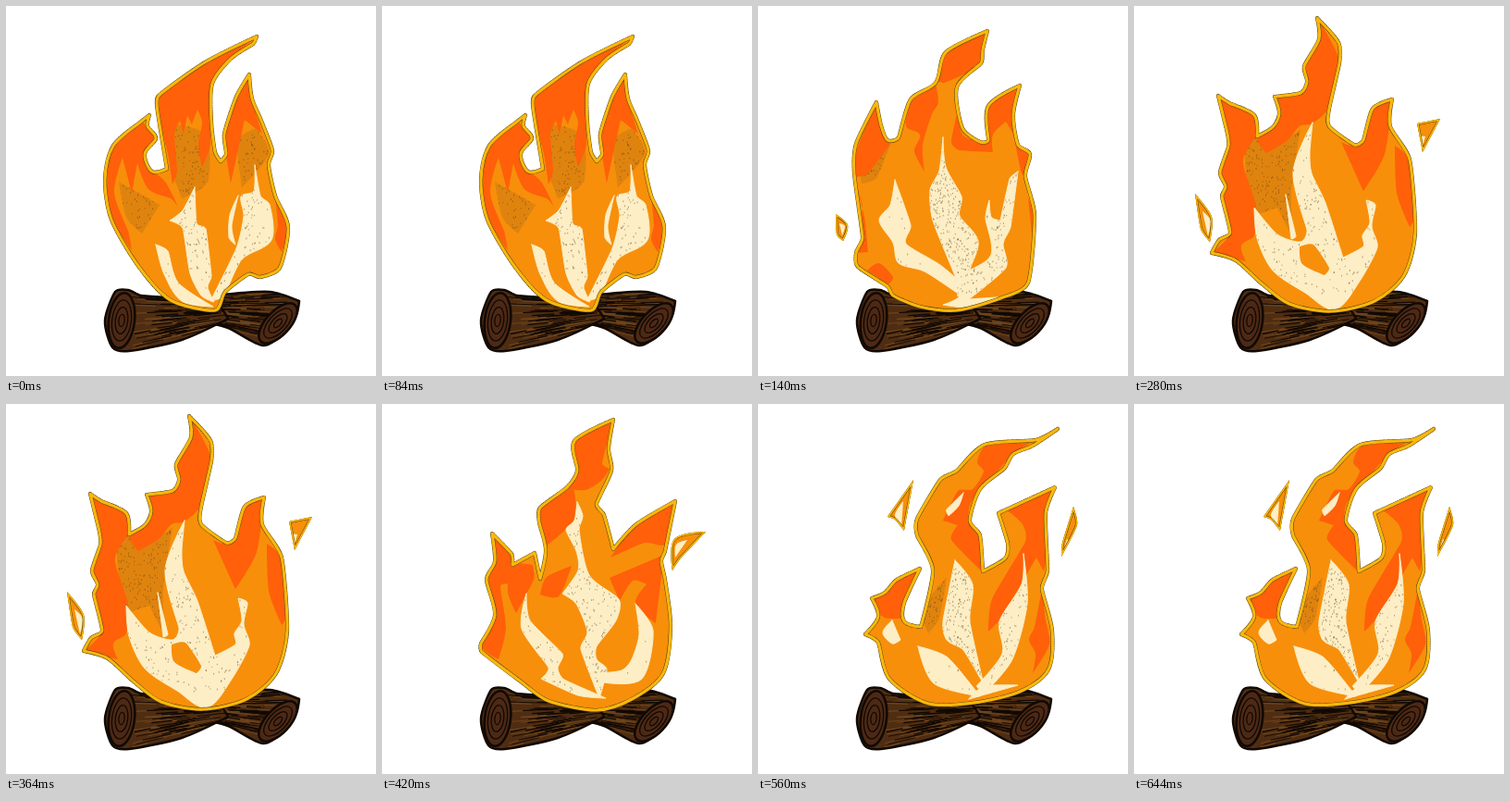
An HTML page with a canvas for the animation above (0.7 s loop, 400 by 400 pixels).

```html
<!DOCTYPE html>
<html lang="en">
<head>
<meta charset="utf-8">
<title>Campfire</title>
<style>
html, body { margin: 0; width: 100%; height: 100%; overflow: hidden; background: #fff; }
canvas { display: block; width: 400px; height: 400px; }
</style>
</head>
<body>
<canvas id="stage" width="400" height="400"></canvas>
<script>
const STEP = 140;
const ORANGE = '#f78f0b', YELLOW = '#fbb70d', RED = '#ff6009', CREAM = '#fdeec5', OCHRE = '#df830f', BARK = '#110904';
const ctx = document.getElementById('stage').getContext('2d');
let edge;

function random(seed) {
  return () => (seed = seed * 16807 % 2147483647) / 2147483647;
}

// Closed curve through the points: gentle turns are rounded, sharp ones stay pointed.
function curve(text) {
  const pts = text.split(' ').map(p => p.split(',').map(Number));
  const n = pts.length, path = new Path2D();
  const tangent = i => {
    const [a, b, c] = [pts[(i + n - 1) % n], pts[i % n], pts[(i + 1) % n]];
    const u = [b[0] - a[0], b[1] - a[1]], v = [c[0] - b[0], c[1] - b[1]];
    const lu = Math.hypot(...u), lv = Math.hypot(...v);
    if ((u[0] * v[0] + u[1] * v[1]) / (lu * lv) < 0.15) return [0, 0];
    const k = Math.min(lu, lv) * 0.3 / Math.hypot(u[0] + v[0], u[1] + v[1]);
    return [(u[0] + v[0]) * k, (u[1] + v[1]) * k];
  };
  path.moveTo(...pts[0]);
  for (let i = 0; i < n; i++) {
    const p = pts[i], q = pts[(i + 1) % n], s = tangent(i), t = tangent(i + 1);
    path.bezierCurveTo(p[0] + s[0], p[1] + s[1], q[0] - t[0], q[1] - t[1], q[0], q[1]);
  }
  path.closePath();
  return path;
}

function paint(path, fill, line, width) {
  if (fill) { ctx.fillStyle = fill; ctx.fill(path); }
  if (line) { ctx.strokeStyle = line; ctx.lineWidth = width; ctx.stroke(path); }
}

function within(path, drawInside) {
  ctx.save();
  ctx.clip(path);
  drawInside();
  ctx.restore();
}

function speckle(path, count) {
  const rnd = random(91);
  within(path, () => {
    ctx.fillStyle = 'rgba(80, 58, 20, .45)';
    for (let i = 0; i < count; i++) ctx.fillRect(105 + rnd() * 200, 120 + rnd() * 190, 1, 1 + rnd());
  });
}

function body(pts) {
  edge = curve(pts);
  ctx.save();
  ctx.clip(edge);
  paint(edge, ORANGE);
}

const red = pts => paint(curve(pts), RED);
const hole = pts => paint(curve(pts), ORANGE);

function ochre(pts) {
  const path = curve(pts);
  paint(path, OCHRE);
  speckle(path, 1300);
}

function cream(pts, grain = 900) {
  const path = curve(pts);
  paint(path, CREAM, CREAM, 1);
  speckle(path, grain);
}

function outline(path) {
  ctx.setLineDash([1, 1.5]);
  paint(path, null, '#4b3a0a', 4.2);
  ctx.setLineDash([]);
  paint(path, null, YELLOW, 3.2);
}

function rim() {
  ctx.restore();
  outline(edge);
}

function ember(pts, core) {
  const path = curve(pts);
  paint(path, ORANGE);
  paint(curve(core), CREAM);
  within(path, () => outline(path));
}

// Wood grain from the segment x = x0, y0..y1 to the segment x = x2, y2..y3.
function hatch([x0, y0, y1], [x2, y2, y3], count, color, seed) {
  const rnd = random(seed), mix = (p, q, t) => p + (q - p) * t;
  ctx.strokeStyle = color;
  for (let i = 0; i < count; i++) {
    const t = rnd(), from = rnd() * 0.8, to = from + 0.15 + rnd() * 0.3;
    const y = s => mix(mix(y0, y1, t), mix(y2, y3, t), s);
    ctx.lineWidth = 0.7 + rnd() * 0.8;
    ctx.beginPath();
    ctx.moveTo(mix(x0, x2, from), y(from));
    ctx.lineTo(mix(x0, x2, to), y(to) + rnd() * 2 - 1);
    ctx.stroke();
  }
}

function log(pts, a, b, seed) {
  const path = curve(pts);
  paint(path, '#4f2d12');
  within(path, () => {
    hatch(a, b, 45, '#70451a', seed);
    hatch(a, b, 75, BARK, seed + 50);
  });
  paint(path, null, BARK, 2.5);
}

function rings(x, y, rx, ry, tilt) {
  for (const k of [1, 0.74, 0.48, 0.22]) {
    const ring = new Path2D();
    ring.ellipse(x, y, rx * k, ry * k, tilt, 0, 7);
    paint(ring, k === 1 ? '#4d2915' : null, BARK, k === 1 ? 2.5 : 1.3);
  }
}

function logs() {
  log('205,321 235,312 285,309 317,319 314,334 303,351 278,367 240,348 205,338', [205, 316, 342], [300, 308, 366], 7);
  log('118,309 132,307 146,313 225,320 240,338 190,361 133,373 115,369 107,340', [134, 308, 372], [232, 318, 346], 19);
  rings(125, 340, 14, 30, 0.12);
  rings(294, 343, 13, 27, 0.75);
}

function leanRight() {
  body('271,33 267,41 243,57 223,84 222,125 226,158 232,168 238,160 236,138 249,98 263,74 266,100 276,124 288,156 284,172 291,205 305,239 296,283 275,293 262,290 237,309 226,329 178,318 143,281 114,231 107,188 116,151 146,125 155,118 153,130 162,143 150,160 158,179 174,176 164,115 165,97 215,61');
  ochre('182,128 216,140 218,190 190,208 176,165');
  ochre('250,146 270,132 284,160 255,196');
  ochre('122,190 166,215 147,246 130,228');
  red('146,125 118,149 107,180 112,225 136,264 132,243 117,202 126,164 136,202 142,170 154,198 178,208 186,217 172,190 150,168 162,143');
  red('271,33 215,61 163,98 164,115 175,160 180,193 185,178 182,138 188,124 192,139 196,118 201,128 207,112 212,126 208,150 212,174 221,150 222,85 243,57');
  red('263,74 239,123 235,140 243,192 258,123 277,138 266,102');
  red('291,206 305,239 298,266 291,252 294,237');
  cream('204,196 191,221 177,232 191,240 199,289 211,313 225,320 218,304 222,292 216,241 206,235');
  cream('162,258 175,265 186,299 224,325 190,319 171,290', 200);
  cream('269,172 275,205 285,215 287,253 255,274 236,313 221,319 249,262 257,227 254,206 268,200');
  cream('251,205 244,238 248,258 241,250 242,226', 0);
  rim();
}

function broad() {
  body('248,27 243,47 241,62 215,88 221,132 240,147 249,145 249,108 283,86 276,118 281,150 294,160 289,184 299,226 292,299 262,316 215,329 175,325 146,313 140,303 108,282 106,267 113,250 104,181 106,149 128,104 133,129 140,145 152,142 165,101 192,83 203,50');
  ochre('112,172 143,150 128,186 112,192');
  red('248,27 203,50 190,78 201,83 228,71 241,60');
  red('192,83 165,101 160,130 175,139 169,157 180,179 178,151 188,117 195,104');
  red('128,104 107,155 104,185 119,181 144,148 134,138');
  red('106,194 113,218 106,267 119,266 115,228');
  red('118,286 131,278 146,293 141,301');
  red('283,86 249,108 248,146 222,140 216,112 209,147 218,156 254,158 254,139 268,125 276,138');
  red('276,138 296,160 289,187 284,178');
  red('292,208 302,232 297,255');
  cream('148,188 165,237 160,257 197,280 222,302 218,312 180,287 152,278 146,256 131,232 143,215', 200);
  cream('200,142 203,174 220,206 218,227 238,254 229,286 230,312 216,314 213,292 189,232 186,199 196,178', 2200);
  cream('281,179 273,239 265,257 268,283 228,317 271,314 234,326 200,323 219,313 223,290 252,269 246,230 250,210 252,228 262,232 272,187', 1500);
  rim();
  ember('84,225 97,237 92,254 85,247', '88,235 94,238 91,248');
}

function tall() {
  body('198,13 214,30 222,42 222,62 211,111 211,130 238,150 248,145 258,111 279,101 277,130 298,166 304,245 292,291 260,319 213,330 168,322 138,300 110,275 84,267 92,253 104,245 95,206 99,195 93,180 102,152 101,138 91,97 103,105 130,118 133,141 150,131 157,116 152,98 180,94 187,82 184,65 200,36');
  ochre('118,140 160,145 180,133 170,202 172,252 155,218 134,225 123,195');
  red('198,13 200,36 184,65 180,94 152,98 157,116 133,141 143,159 165,146 179,130 193,127 212,108 222,60');
  red('91,97 101,138 93,172 95,210 104,245 84,267 121,276 116,259 130,248 132,216 118,168 133,138 130,118');
  red('279,101 258,111 252,138 238,151 224,147 248,200 271,160');
  red('282,151 298,166 303,230 298,239 284,202');
  cream('193,126 190,159 192,181 207,213 226,272 248,260 247,248 255,234 251,210 261,215 257,238 263,261 243,299 217,328 185,310 150,286 133,251 130,218 155,247 180,255 187,242 172,180', 700);
  cream('164,204 175,249 170,252', 0);
  hole('179,260 194,258 211,283 206,291 182,279');
  rim();
  ember('66,203 84,228 82,255 72,241', '74,222 83,232 80,249');
  ember('306,127 331,122 312,158', '308,140 315,141 311,155');
}

function stepped() {
  body('250,17 245,48 248,72 232,108 240,120 250,157 275,130 317,105 306,159 302,170 306,190 312,241 304,291 272,318 232,331 180,321 150,300 108,268 107,259 122,228 113,190 122,170 119,140 140,162 141,174 165,161 171,189 177,158 170,128 171,112 200,90 211,72 208,40');
  red('250,17 208,40 211,72 198,91 220,93 238,82 246,70 238,64');
  red('207,89 171,112 170,128 177,154 208,124');
  red('119,140 122,170 113,190 122,228 107,260 126,276 134,242 128,197 140,192 140,164');
  red('141,175 163,174 164,190 145,226 136,203');
  red('205,175 178,187 171,206 191,208');
  red('317,105 275,130 247,166 284,150 307,151');
  red('246,188 305,163 296,237 274,216 286,195 271,191 257,213');
  cream('211,106 217,121 213,136 224,185 256,211 253,234 232,262 232,276 243,287 235,318 215,265 222,246 210,216 195,205 212,180 210,159 199,136 208,126', 1100);
  cream('156,205 160,234 195,270 190,286 197,298 242,318 212,315 172,297 180,285 151,243');
  cream('274,216 293,245 281,297 239,301 234,291 259,288 270,276 278,249', 200);
  rim();
  ember('316,146 350,138 322,168 314,180', '318,152 330,147 317,166');
}

function curl() {
  body('324,27 297,45 276,54 266,70 240,92 229,126 240,142 243,181 267,167 270,151 260,118 321,90 311,118 313,180 307,200 318,245 314,287 285,310 240,322 185,324 142,297 130,258 116,249 130,230 123,210 137,204 150,190 175,178 158,215 158,235 176,241 189,180 172,142 172,124 197,82 215,72 245,44 300,39');
  ochre('177,222 204,187 196,232 184,248');
  red('300,39 246,46 237,63 244,73 232,92 216,94 200,126 216,131 209,147 243,182 239,143 228,125 231,105 276,54');
  red('321,90 268,114 286,130 289,149 253,211 249,246 264,230 301,166 309,181 314,155 309,140');
  red('307,200 299,241 293,255 300,270 297,291 315,260 311,234');
  red('175,178 123,207 135,230 159,231 158,212');
  cream('213,169 232,195 229,235 244,303 222,266 204,255 200,235', 2000);
  cream('287,162 291,216 275,276 246,311 236,305 264,270 261,235 285,195', 1200);
  cream('173,262 205,274 240,316 190,302', 300);
  cream('228,319 244,305 281,304', 0);
  cream('145,234 154,255 145,259 135,247', 0);
  cream('222,96 217,110 206,121 204,114', 0);
  rim();
  ember('168,82 158,137 148,125 140,122', '157,105 155,133 148,120');
  ember('341,111 345,131 328,165 329,150', '334,146 337,148 329,161');
}

const poses = [leanRight, broad, tall, stepped, curl];
ctx.lineJoin = ctx.lineCap = 'round';

let shown = -1;
function tick() {
  const i = Math.floor(performance.now() / STEP) % poses.length;
  if (i !== shown) {
    shown = i;
    ctx.fillStyle = '#fff';
    ctx.fillRect(0, 0, 400, 400);
    logs();
    poses[i]();
  }
  requestAnimationFrame(tick);
}
tick();
</script>
</body>
</html>
```
